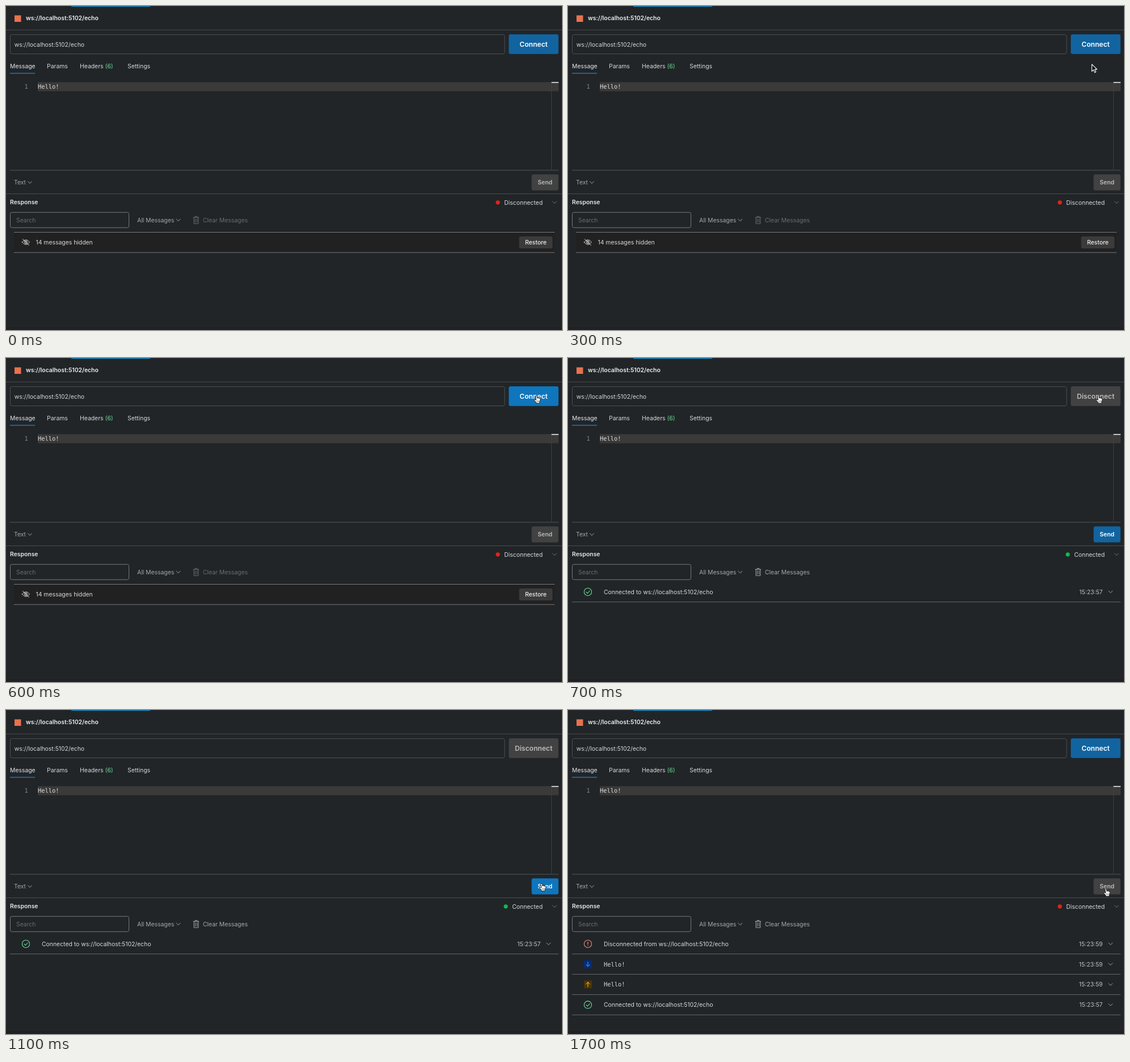
These frames come from a looping animation (979 px wide and 572 px high, 3050 ms). An HTML page:

```html
<!DOCTYPE html>
<html lang="en">
<head>
<meta charset="utf-8">
<title>WebSocket echo</title>
<style>
  html, body { margin: 0; width: 100%; height: 100%; overflow: hidden; background: #212528; }
  svg { display: block; width: 979px; height: 572px; font: 10.4px Inter, sans-serif; }
  text { white-space: pre; }
  .mono { font: 10.4px "DejaVu Sans Mono", monospace; }
</style>
</head>
<body>
<svg id="stage" viewBox="0 0 979 572"></svg>
<script>
const LOOP = 3050;
const GREEN = '#6bdd9a', GRAY = '#a6a6a6', DIM = '#6b6b6b', LIGHT = '#d8d8d8';
const BLUE = '#1264a0', HOVER = '#0f76bd', BUTTON = '#424242';
const URL_TEXT = 'ws://localhost:5102/echo';

// start time, cursor shape, hot spot
const steps = [
  [0],
  [200, 'beam', 918, 178],
  [300, 'arrow', 922.4, 102.8],
  [400, 'hand', 930, 77],
  [500, 'hand', 933.2, 67.5],
  [600, 'hand', 933.6, 66.3],
  [1000, 'beam', 928, 282],
  [1100, 'hand', 943, 306],
  [1200, 'hand', 947, 315.3]
];

// y is the middle of the capitals
const text = (x, y, s, fill = LIGHT, attrs = '') =>
  `<text x="${x}" y="${y + 3.8}" fill="${fill}" ${attrs}>${s}</text>`;
const semi = 'font-weight="600"', right = 'text-anchor="end"', mono = 'class="mono"';
const rect = (x, y, w, h, fill, attrs = '') =>
  `<rect x="${x}" y="${y}" width="${w}" height="${h}" fill="${fill}" ${attrs}/>`;
const box = (x, y, w, h, stroke) => rect(x, y, w, h, 'none', `rx="3" stroke="${stroke}"`);
const path = (d, stroke, width = 1, fill = 'none') =>
  `<path d="${d}" fill="${fill}" stroke="${stroke}" stroke-width="${width}" stroke-linecap="round" stroke-linejoin="round"/>`;
const dot = (x, y, r, fill, stroke = 'none') =>
  `<circle cx="${x}" cy="${y}" r="${r}" fill="${fill}" stroke="${stroke}" stroke-width="1.1"/>`;
const chevron = (x, y, color) => path(`M${x - 3.5} ${y - 1.8}l3.5 3.5 3.5-3.5`, color);
const button = (x, y, w, h, label, fill, color, size = 10.4, weight = 600) =>
  rect(x, y, w, h, fill, 'rx="3"') +
  `<text x="${x + w / 2}" y="${y + h / 2 + size * .365}" fill="${color}" text-anchor="middle"
    style="font-size:${size}px;font-weight:${weight}">${label}</text>`;

const icons = {
  ok: y => dot(35, y, 6.6, 'none', GREEN) + path(`M32 ${y + .2}l2.2 2.2 4-4.3`, GREEN, 1.1),
  error: y => dot(35, y, 6.6, 'none', '#f28b7d') + path(`M35 ${y - 3.2}v3.6m0 2.4v.2`, '#f28b7d', 1.3),
  down: y => rect(28, y - 7, 14, 14, '#042c78', 'rx="1"') +
    path(`M35 ${y - 4}v8m-3.5-3.5l3.5 3.5 3.5-3.5`, '#5a9cf5'),
  up: y => rect(28, y - 7, 14, 14, '#4a3500', 'rx="1"') +
    path(`M35 ${y + 4}v-8m-3.5 3.5l3.5-3.5 3.5 3.5`, '#f8c95c')
};

const cursors = {
  arrow: path('M0 0V12.6L2.9 9.9 5 14.6 7.2 13.6 5.1 9.1H9.1Z', '#fff', 1.1, '#111'),
  beam: path('M-3-6.5Q-.5-6.5 0-5.3Q.5-6.5 3-6.5M0-5.3V5.5M-3 6.7Q-.5 6.7 0 5.5Q.5 6.7 3 6.7M-1.2 1.8H1.2', '#fff', 1.3),
  hand: path('M-1.2 1Q0-.9 1.1 1L1.8 4.9Q3-.0 3.8 5Q5-.0 5.7 5.4Q7.4 4.4 7.3 7L6.4 10.6 5.9 13.6H.2L-.5 11.5-3.4 8.3Q-3.3 6.1-.5 7.8Z', '#111', .9, '#fff') +
    path('M1.4 9v2.5m1.8-2.5v2.5m1.8-2.5v2.5', '#333', .6)
};

const frame =
  rect(0, 0, 979, 572, '#212528') +
  rect(0, 567, 979, 5, '#1f2123') +
  rect(115, 0, 139, 1.2, '#1597d4') +
  rect(15, 16.5, 11.5, 11.5, '#e8714f') +
  text(35, 21.5, URL_TEXT, '#eee', semi) +
  rect(0, 41.8, 979, 1, '#4a4d4f') +
  box(7.5, 50.5, 870.5, 34, '#4d5052') +
  text(14.8, 67.7, URL_TEXT) +
  text(7, 106, 'Message', '#e6e6e6') +
  text(72, 106, 'Params') +
  text(130, 106, `Headers <tspan fill="${GREEN}">(6)</tspan>`) +
  text(214, 106, 'Settings') +
  rect(7, 118, 44, 1.5, '#1976b9') +
  rect(56, 134.5, 917, 16, '#3a3a3a') +
  rect(960, 134, 1, 155, '#3b3f41') +
  rect(960.5, 134, 12.5, 2, '#c4c4c4') +
  text(32.5, 142, '1', '#858585', mono) +
  text(56, 142, 'Hello!', '#dedede', mono) +
  rect(7, 289.5, 966, 1, '#56595b') +
  text(14, 311.5, 'Text', GRAY) + chevron(42, 311.5, GRAY) +
  rect(0, 331, 979, 1, '#4a4d4f') +
  text(7, 346.3, 'Response', '#e6e6e6', semi) +
  chevron(966, 346.8, '#777') +
  box(7.5, 364.3, 209, 27, '#77797b') +
  text(18, 378, 'Search', DIM) +
  text(231, 378, 'All Messages', GRAY) + chevron(303.3, 378, GRAY);

function row(i, [icon, message, time, attrs]) {
  const y = 412.9 + i * 35.85;
  return icons[icon](y) + text(63, y, message, LIGHT, attrs) +
    text(941.5, y, time, '#c0c0c0', right) + chevron(955.3, y, GRAY) +
    rect(7, y + 17.3, 966, 1, '#66696b');
}

const hiddenNote =
  rect(14, 399.5, 952, 35.5, '#212121') +
  rect(14, 399, 952, 1, '#77797b') + rect(14, 434.7, 952, 1, '#77797b') +
  path('M28.5 417q6.5-8.6 13 0q-6.5 8.6-13 0zM29.5 411.6l11 10.8', LIGHT) + dot(35, 417, 2.1, 'none', LIGHT) +
  text(52.5, 417.5, '14 messages hidden') +
  button(903.5, 406.8, 58.8, 21.2, 'Restore', '#3b3b3b', '#eee', 10.4, 500);

function draw(time, [start, shape, x, y]) {
  const used = time >= 700, done = time >= 1700, online = used && !done;
  const overConnect = start >= 400 && start < 1000, overSend = start >= 1100;
  const ink = used ? GRAY : DIM;
  const log = [['ok', 'Connected to ' + URL_TEXT, '15:23:57']];
  if (done) log.unshift(
    ['error', 'Disconnected from ' + URL_TEXT, '15:23:59'],
    ['down', 'Hello!', '15:23:59', mono],
    ['up', 'Hello!', '15:23:59', mono]);
  return frame +
    (online ? button(885.3, 50, 87.5, 34.8, 'Disconnect', BUTTON, '#bcbcbc', 12.1)
            : button(885.3, 50, 87.5, 34.8, 'Connect', overConnect ? HOVER : BLUE, '#fff', 12.1)) +
    button(925.5, 297.3, 47.3, 28.2, 'Send', online ? (overSend ? HOVER : BLUE) : BUTTON, online ? '#fff' : '#bcbcbc') +
    dot(online ? 880 : 866, 346.8, 3.6, online ? '#0cbb52' : '#eb2013') +
    text(945, 346.8, online ? 'Connected' : 'Disconnected', LIGHT, right) +
    path('M330 373.2h9.6m-6.5 0v-1.7h3.4v1.7m-5.6 0v11h7.8v-11m-5.4 2.5v6m3 -6v6', ink) +
    text(346.7, 378, 'Clear Messages', ink) +
    (used ? log.map((entry, i) => row(i, entry)).join('') : hiddenNote) +
    (shape ? `<g transform="translate(${x} ${y})">${cursors[shape]}</g>` : '');
}

const stage = document.getElementById('stage');
let shown = '';
function tick() {
  const time = performance.now() % LOOP;
  const picture = draw(time, steps.findLast(step => step[0] <= time));
  if (picture !== shown) stage.innerHTML = shown = picture;
  requestAnimationFrame(tick);
}
tick();
</script>
</body>
</html>
```
